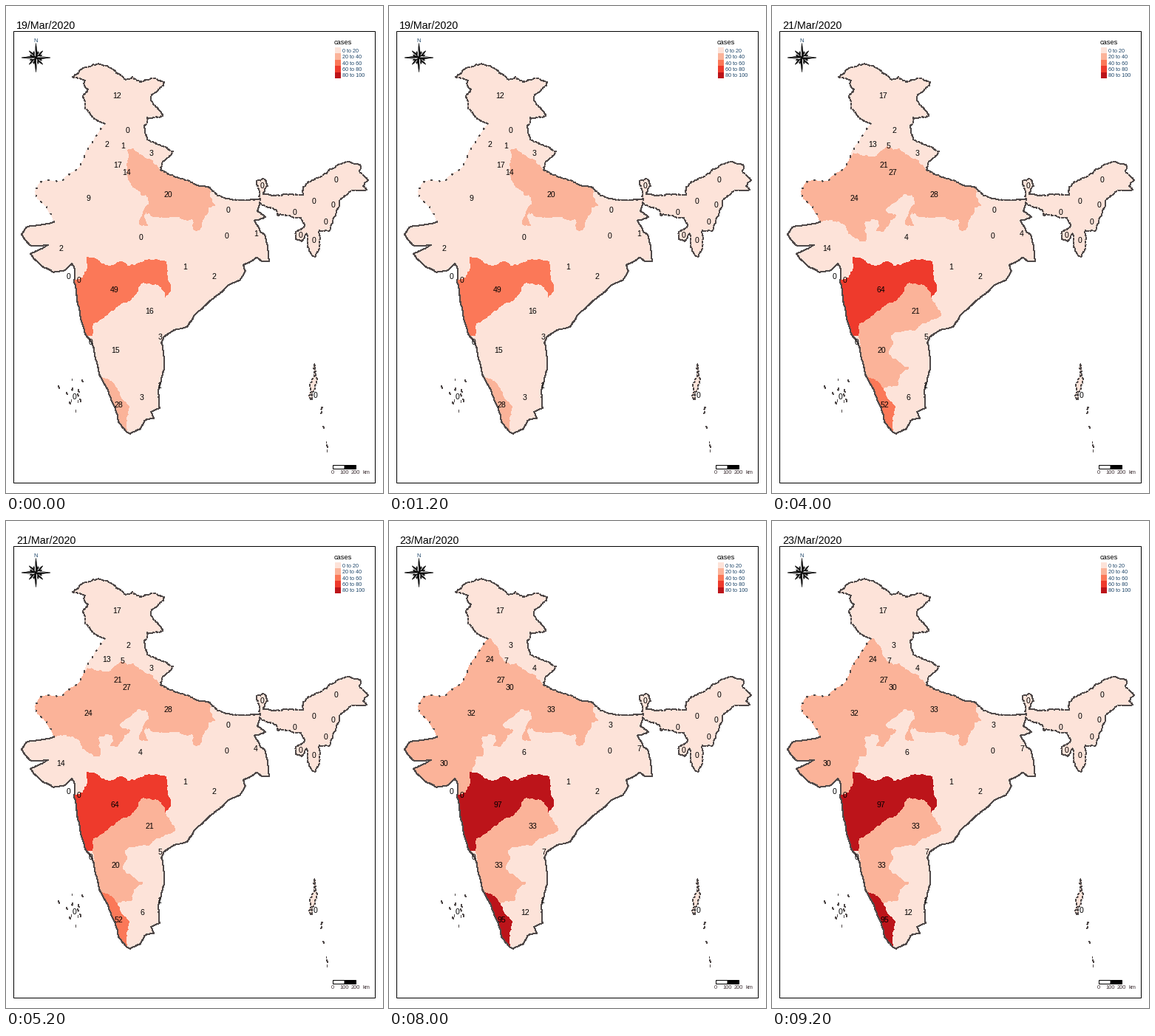
Recreate the animation shown at these times as a matplotlib script. Size 510 px wide and 660 px high, loop 10000 ms.

```python
import math
import random

import matplotlib.pyplot as plt
from matplotlib.animation import FuncAnimation
from matplotlib.patches import Polygon, Rectangle

W, H, DPI = 510, 660, 60
PT = 72 / DPI  # points per pixel
REDS = ["#FDE3D9", "#FBB399", "#FB7858", "#EE3A2C", "#BC141A"]
EDGE, NAVY = "#504a4a", "#1c4468"
rng = random.Random(7)

# Key points of each border; the outer ones run clockwise around the country.
COAST = {
    "bengal": [(343, 266), (340, 278), (351, 286), (336, 291), (344, 306), (350, 310),
               (354, 328), (356, 346), (346, 346), (339, 341), (321, 351)],
    "east": [(321, 351), (324, 359), (317, 371), (300, 379), (280, 397), (254, 420),
             (245, 435), (226, 440), (213, 449), (210, 456), (214, 490), (207, 516),
             (208, 545), (196, 550), (200, 559), (187, 562), (182, 573), (168, 580),
             (163, 577)],
    "kerala_w": [(163, 577), (153, 565), (142, 533), (126, 498)],
    "karnataka_w": [(126, 498), (121, 479), (119, 464)],
    "goa_w": [(119, 464), (114, 453), (108, 446)],
    "maha_w": [(108, 446), (101, 424), (96, 400), (92, 373)],
    "gujarat_w": [(92, 373), (93, 356), (89, 349), (80, 358), (64, 361), (48, 352),
                  (33, 336), (57, 324), (34, 325), (21, 310), (29, 299), (65, 293)],
}
PLAIN = {
    "raj_w": [(65, 293), (55, 272), (40, 256), (40, 250), (48, 237), (76, 238),
              (100, 218), (106, 204)],
    "punjab_w": [(106, 204), (113, 189), (124, 174), (134, 160)],
}
HILLS = {
    "kashmir_w": [(134, 160), (118, 151), (107, 139), (104, 123), (111, 113), (105, 105),
                  (107, 101), (90, 96), (104, 84), (118, 79), (137, 81)],
    "himalaya": [(137, 81), (163, 100), (171, 96), (182, 103), (201, 98), (214, 103),
                 (213, 108), (204, 116), (196, 122), (196, 128), (204, 137), (212, 149),
                 (205, 151), (191, 151), (191, 158), (187, 163), (191, 181), (211, 190),
                 (226, 197), (213, 210), (209, 222)],
    "up_n": [(209, 222), (222, 229), (243, 236), (258, 243), (276, 246)],
    "bihar_n": [(276, 246), (286, 257), (322, 263), (344, 263), (339, 237), (349, 234),
                (354, 244), (348, 255)],
    "assam_n": [(348, 255), (370, 257), (402, 256), (402, 245), (427, 231), (447, 216),
                (465, 211), (479, 215), (478, 226), (490, 236)],
    "assam_s": [(490, 236), (483, 244), (488, 249), (466, 251), (451, 264), (446, 283),
                (437, 305), (424, 304), (424, 326), (418, 340), (412, 335), (407, 308),
                (400, 319), (392, 316), (392, 306), (405, 297), (399, 287), (367, 284),
                (366, 277), (343, 266)],
}
INNER = {
    "raj_punjab": [(106, 204), (111, 198), (122, 202), (140, 203), (155, 190)],
    "punjab_e": [(155, 190), (146, 170), (138, 160), (134, 160)],
    "haryana_n": [(155, 190), (164, 197)],
    "up_w": [(164, 197), (164, 220), (168, 243), (182, 254)],
    "up_top": [(164, 197), (172, 193), (180, 201), (197, 209), (209, 222)],
    "up_s": [(276, 246), (275, 258), (283, 270), (274, 273), (265, 290), (261, 304),
             (254, 303), (254, 290), (230, 285), (214, 287), (188, 279), (187, 287),
             (192, 297), (181, 296), (186, 278), (193, 269), (192, 259), (182, 254)],
    "raj_mp": [(182, 254), (168, 265), (153, 278), (168, 284), (159, 291), (151, 305),
               (141, 305), (146, 297), (142, 289), (126, 292), (127, 318), (118, 319)],
    "raj_guj": [(118, 319), (103, 309), (99, 298), (90, 292), (65, 293)],
    "guj_mp": [(118, 319), (116, 330), (110, 340)],
    "guj_maha": [(110, 340), (111, 355), (104, 368), (92, 373)],
    "maha_n": [(110, 340), (120, 342), (130, 350), (145, 352), (155, 346), (165, 353),
               (187, 346), (217, 346), (219, 372), (223, 385), (215, 395)],
    "maha_s": [(215, 395), (210, 382), (183, 377), (176, 391), (146, 413), (118, 431),
               (117, 446)],
    "maha_goa": [(117, 446), (108, 446)],
    "goa_e": [(119, 464), (120, 453), (117, 446)],
    "south_e": [(215, 395), (229, 417), (193, 440), (158, 446), (164, 457), (157, 472),
                (170, 481), (185, 491), (173, 499), (170, 514), (150, 518)],
    "kerala_n": [(150, 518), (140, 508), (126, 498)],
    "kerala_e": [(150, 518), (155, 530), (166, 542), (163, 557), (163, 577)],
}
COUNTRY = ("punjab_w kashmir_w himalaya up_n bihar_n assam_n assam_s bengal east kerala_w "
           "karnataka_w goa_w maha_w gujarat_w raj_w")
# Borders around each shaded state ("-" = walked backwards).
SHADED = {
    "up": "up_top up_n up_s -up_w",
    "rajasthan": "raj_w raj_punjab haryana_n up_w raj_mp raj_guj",
    "punjab": "punjab_w -punjab_e -raj_punjab",
    "gujarat": "gujarat_w -raj_guj guj_mp guj_maha",
    "maha": "maha_w -guj_maha maha_n maha_s maha_goa",
    "karnataka": "south_e kerala_n karnataka_w goa_e -maha_s",
    "kerala": "kerala_w -kerala_n kerala_e",
}

# Label position and cases per day; the last count stays.
CASES = {
    "up": (219, 256, 20, 24, 28, 30, 33), "rajasthan": (111, 261, 9, 17, 24, 29, 32),
    "punjab": (136, 188, 2, 3, 13, 21, 24), "gujarat": (74, 329, 2, 7, 14, 18, 30),
    "maha": (147, 385, 49, 54, 64, 74, 97), "karnataka": (148, 467, 15, 15, 20, 26, 33),
    "kerala": (152, 541, 28, 40, 52, 67, 95), "telangana": (194, 414, 16, 19, 21, 27, 33),
    "haryana": (151, 216, 17, 19, 21, 21, 27), "delhi": (163, 226, 14, 20, 27, 27, 30),
    "ladakh": (150, 122, 12, 14, 17), "himachal": (165, 169, 0, 2, 2, 2, 3),
    "chandigarh": (158, 190, 1, 5, 5, 6, 7), "uttarakhand": (197, 200, 3, 3, 3, 3, 4),
    "bihar": (300, 277, 0, 0, 0, 2, 3), "bengal": (338, 309, 1, 2, 4, 7),
    "mp": (182, 314, 0, 4, 4, 6), "andhra": (209, 449, 3, 3, 5, 6, 7),
    "tamil": (184, 531, 3, 3, 6, 9, 12),
}
STEADY = {
    0: [(299, 312), (346, 244), (446, 236), (416, 265), (442, 270), (391, 280), (433, 293),
        (398, 311), (416, 318), (84, 367), (98, 372), (114, 456), (93, 530), (418, 528)],
    1: [(242, 354), (207, 515)],
    2: [(281, 367)],
}


def roughen(pts, amp):
    """Halve every stretch down to 3 px, pushing the midpoints sideways."""
    out = [pts[0]]
    for (x0, y0), (x1, y1) in zip(pts, pts[1:]):
        d = math.hypot(x1 - x0, y1 - y0)
        if d < 3:
            out.append((x1, y1))
            continue
        k = rng.uniform(-amp, amp) / math.sqrt(d)
        mid = (x0 + x1) / 2 - k * (y1 - y0), (y0 + y1) / 2 + k * (x1 - x0)
        out += roughen([(x0, y0), mid], amp)[1:] + roughen([mid, (x1, y1)], amp)[1:]
    return out


def ring(names):
    pts = []
    for name in names.split():
        arc = arcs[name.lstrip("-")]
        pts += arc[::-1] if name[0] == "-" else arc
    return pts


def fill(pts, color):
    return ax.add_patch(Polygon(pts, fc=color, lw=0, antialiased=False))


def stroke(pts, dash=None):
    ax.plot(*zip(*pts), color=EDGE, lw=PT, antialiased=False, dash_capstyle="butt",
            ls=(0, dash) if dash else "-")


def box(x, y, w, h, color):
    ax.add_patch(Rectangle((x, y), w, h, fc=color, ec="black", lw=PT, snap=False))


def label(x, y, s, px, color="black", ha="center", va="center"):
    return ax.text(x, y, s, size=px * PT, color=color, ha=ha, va=va, family="Liberation Sans")


def compass(cx, cy):
    def at(r, a):
        return cx + r * math.sin(a), cy - r * math.cos(a)

    # thin points first, then the diagonals, then the four long ones
    for first, step, length in ((1, 2, 9), (2, 4, 13), (0, 4, 19.5)):
        for i in range(first, 16, step):
            a = i * math.pi / 8
            for side, color in ((-0.6, "white"), (0.6, "black")):
                ax.add_patch(Polygon([(cx, cy), at(length, a), at(4, a + side)],
                                     fc=color, ec="black", lw=0.5 * PT))


arcs = {}
for group, amp in ((COAST, 0.2), (PLAIN, 0.3), (HILLS, 0.35), (INNER, 0.5)):
    arcs.update({name: roughen(pts, amp) for name, pts in group.items()})

fig = plt.figure(figsize=(W / DPI, H / DPI), dpi=DPI, facecolor="white")
ax = fig.add_axes([0, 0, 1, 1])
ax.set(xlim=(0, W), ylim=(H, 0))
ax.axis("off")

box(10.5, 34.5, 489, 612, "none")
title = label(14, 31, "", 14.3, ha="left", va="baseline")

fill(ring(COUNTRY), REDS[0])
states = {name: fill(ring(names), REDS[0]) for name, names in SHADED.items()}
for group, dash in ((COAST, None), (HILLS, (3, 1.5)), (PLAIN, (1, 9))):
    for name in group:
        stroke(arcs[name], dash)

# Island chains: one slender island, then scattered specks
island = roughen([(417, 485), (419, 500), (417, 521), (413, 534), (415, 505), (417, 485)], 0.5)
fill(island, REDS[0])
stroke(island, (2, 2))
specks = [(rng.gauss(89, 8), rng.uniform(505, 550)) for _ in range(12)]
specks += [(427 + 6 * t + rng.uniform(-2, 2), 545 + 57 * t) for t in (0, 0.1, 0.45, 0.8, 0.9, 1)]
for x, y in specks:
    stroke([(x, y - 1), (x + rng.choice((-1, 0, 1)), y + 1.5)])

counts = {name: label(x, y, "", 10.5) for name, (x, y, *_) in CASES.items()}
for n, spots in STEADY.items():
    for x, y in spots:
        label(x, y, n, 10.5)

compass(40.5, 70)
label(40, 47.5, "N", 7.5, NAVY)

label(444, 52, "cases", 9.2, ha="left", va="baseline")
for i, color in enumerate(REDS):
    y = 56 + 8.4 * i
    ax.add_patch(Rectangle((445, y), 8, 8.4, fc=color, lw=0, antialiased=False))
    label(455, y + 5.4, f"{20 * i} to {20 * i + 20}", 7.2, NAVY, ha="left")

box(442.5, 622.5, 15.5, 5, "white")
box(458.5, 622.5, 15, 5, "black")
for x, s in ((442, "0"), (458, "100"), (473, "200"), (487, "km")):
    label(x, 633, s, 7.5, "#3a2c30")


def update(day):
    title.set_text(f"{19 + day}/Mar/2020")
    for name, (_, _, *days) in CASES.items():
        n = days[min(day, len(days) - 1)]
        counts[name].set_text(str(n))
        if name in states:
            states[name].set_facecolor(REDS[n // 20])
    return []


anim = FuncAnimation(fig, update, frames=5, interval=2000, repeat=True, repeat_delay=0)
plt.show()
```
